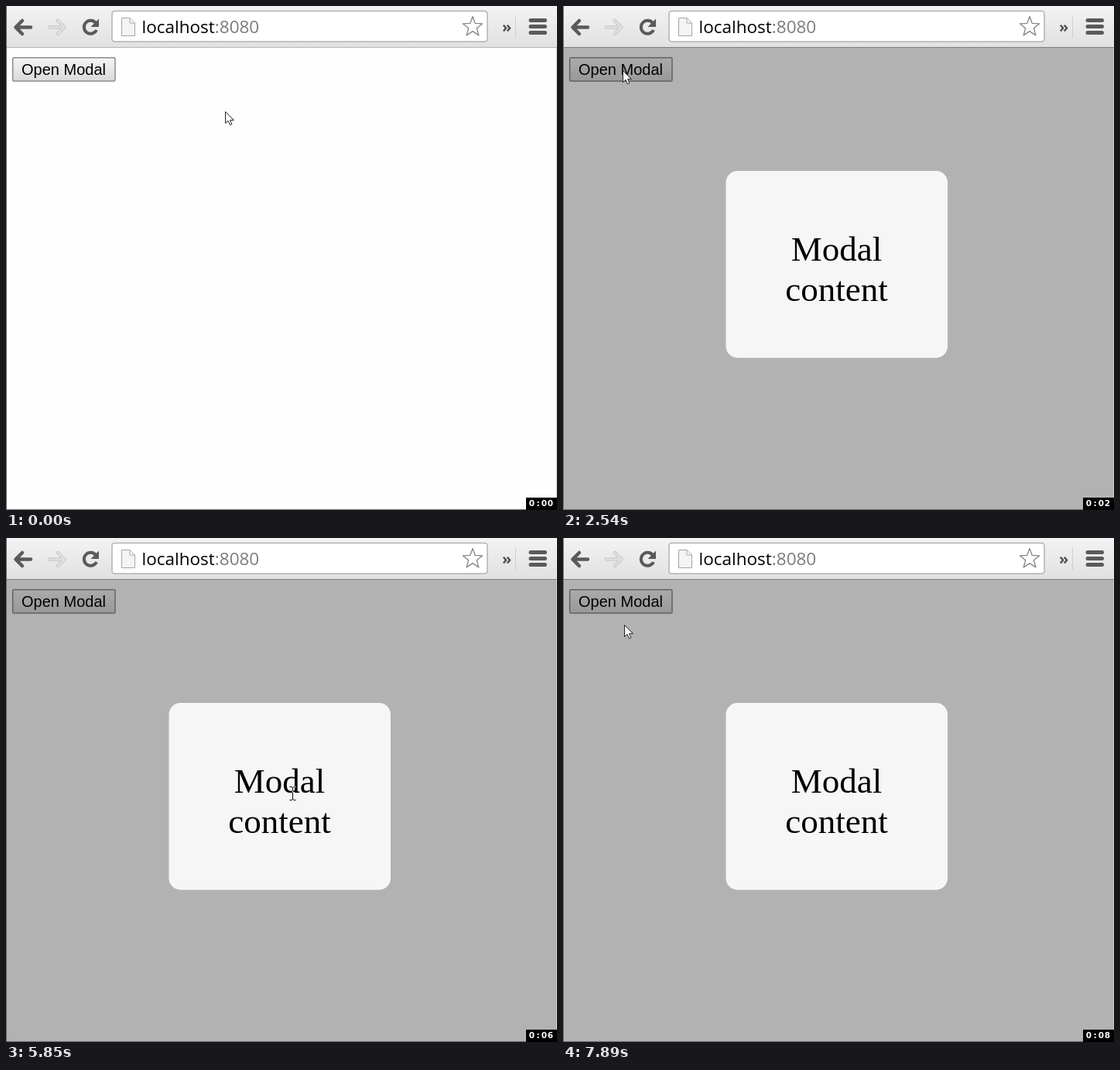
An HTML page for the animation above (7990 ms loop, 712 by 651 pixels).

```html
<!DOCTYPE html>
<html lang="en">
<head>
<meta charset="utf-8">
<title>Modal demo</title>
<style>
  html, body { margin: 0; width: 100%; height: 100%; overflow: hidden; }
  svg { display: block; }
  .url { font: 22.5px "Open Sans", "Noto Sans", sans-serif; }
  .more { font: bold 20px "Open Sans", sans-serif; fill: #505050; }
  .label { font: 20px "Liberation Sans", Arial, sans-serif; }
  .modal { font: 45px "Liberation Serif", "Times New Roman", serif; text-anchor: middle; }
  .clock { font: bold 10.5px "DejaVu Sans", sans-serif; fill: #fff; text-anchor: middle; }
  .icon { fill: none; stroke: #5a5a5a; stroke-width: 4.5; stroke-linejoin: round; stroke-linecap: round; }
  #beam { mix-blend-mode: difference; fill: none; stroke: #fff; }
</style>
</head>
<body>
<svg width="712" height="651" viewBox="0 0 712 651">
  <defs>
    <linearGradient id="bar" x2="0" y2="1"><stop stop-color="#f3f3f3"/><stop offset="1" stop-color="#e1e1e1"/></linearGradient>
    <linearGradient id="idle" x2="0" y2="1"><stop stop-color="#f4f4f4"/><stop offset="1" stop-color="#dadada"/></linearGradient>
    <linearGradient id="hover" x2="0" y2="1"><stop stop-color="#f8f8f8"/><stop offset="1" stop-color="#dedede"/></linearGradient>
    <linearGradient id="down" x2="0" y2="1"><stop stop-color="#d8d8d8"/><stop offset="1" stop-color="#f6f6f6"/></linearGradient>
    <path id="back" d="M32 27.5H13M21 19l-8.5 8.5 8.5 8.5"/>
  </defs>

  <rect width="712" height="651" fill="#fefefe"/>

  <!-- toolbar -->
  <rect width="712" height="53" fill="url(#bar)"/>
  <path d="M0 53.5H712" stroke="#b4b4b4"/>
  <g class="icon">
    <use href="#back"/>
    <g transform="translate(88) scale(-1 1)">
      <use href="#back" stroke="#c6c6c6"/>
      <use href="#back" stroke="#e0e0e0" stroke-width="2.5"/>
    </g>
    <path d="M116 22A8.5 8.5 0 1 0 117 31" stroke-width="4" stroke-linecap="butt"/>
    <path d="M678 18.5h18.5m-18.5 8h18.5m-18.5 8h18.5" stroke-width="5"/>
  </g>
  <path d="M120 16.5V27H109.5Z" fill="#5a5a5a"/>
  <rect x="137" y="6.5" width="485" height="39.5" rx="3.5" fill="#fff" stroke="#b2b2b2" stroke-width="1.5"/>
  <path d="M149.5 15.5H160L166.5 22V38.5H149.5ZM160 15.5V22H166.5" fill="#f4f4f4" stroke="#a6a6a6"/>
  <text class="url" x="175.5" y="34.500">localhost<tspan fill="#7c7c7c">:8080</tspan></text>
  <path id="star" fill="#fff" stroke="#858585" stroke-width="1.3" stroke-linejoin="round"/>
  <text class="more" x="641" y="33.5">»</text>
  <path d="M658.5 12V42" stroke="#cfcfcf"/>

  <!-- page -->
  <rect id="button" x="8.7" y="66.7" width="132.3" height="30.3" rx="1.5" stroke-width="1.5"/>
  <text class="label" x="20" y="89">Open Modal</text>
  <g id="modal">
    <rect x="1" y="53" width="710" height="597" opacity=".3"/>
    <rect x="210.5" y="213" width="286.5" height="241.5" rx="15" fill="#f6f6f6"/>
    <text class="modal" x="353.5" y="329">Modal</text>
    <text class="modal" x="353.5" y="381">content</text>
  </g>
  <path d="M.5 0V651M0 650.5H712" stroke="#686868"/>
  <path d="M711.5 54V651" stroke="#d0d0d0"/>

  <rect x="672" y="635" width="40" height="16"/>
  <text id="clock" class="clock" x="679.5 687.5 695.5 703.5" y="646"></text>

  <!-- pointer -->
  <g id="ring" fill="none">
    <circle r="9" stroke="#fff" stroke-opacity=".45"/>
    <circle r="10" stroke="#222"/>
  </g>
  <path id="arrow" d="M.5.5V15.500L4 12.300 6.500 17.700 8.900 16.700 6.600 11.400H11.300Z" fill="#fff" stroke="#222"/>
  <path id="beam" d="M-3.5-8.5H-1L.5-7.5 2-8.5H4.5M.5-7.5V7.5M-3.5 8.5H-1L.5 7.5 2 8.5H4.5"/>
</svg>
<script>
const LOOP = 7990;
const $ = id => document.getElementById(id);

// Pointer moves: start, end, destination x and y, sideways bend of the path
const origin = [283, 136];
const moves = [
  [120, 450, 115, 217, 0.3],
  [820, 1570, 77, 83, 0.6],
  [2930, 3650, 385, 338, 0.15],
  [3750, 4530, 245, 242, -0.9],
  [4560, 5080, 326, 314, -0.9],
  [5080, 5350, 345, 306, 0],
  [5380, 5850, 370, 330, -1],
  [6000, 6720, 134, 209, -0.1],
  [7080, 7290, 79, 79, 0.1],
  [7740, 7890, 79, 112, 0]
];
const clicks = [[2370, 2510], [6810, 6920], [7530, 7740]];   // press, release

function pointer(t) {
  let [x, y] = origin;
  for (const [start, end, toX, toY, bend] of moves) {
    if (t < start) break;
    const p = Math.min(1, (t - start) / (end - start));
    const u = p * p * (3 - 2 * p), side = 2 * u * (1 - u) * bend;
    const dx = toX - x, dy = toY - y;
    x += dx * u - dy * side;
    y += dy * u + dx * side;
  }
  return [Math.round(x), Math.round(y)];
}

const inside = (x, y, l, t, r, b) => x >= l && x <= r && y >= t && y <= b;
const show = (id, on) => $(id).setAttribute("visibility", on ? "visible" : "hidden");
const place = (id, x, y) => $(id).setAttribute("transform", `translate(${x} ${y})`);

function draw(t) {
  const [x, y] = pointer(t);
  const open = clicks.filter(c => t >= c[1]).length % 2 === 1;
  const press = clicks.find(c => t >= c[0] && t < c[1]);
  const over = !open && inside(x, y, 8, 66, 141, 97);
  const text = open && inside(x, y, 288, 290, 420, 394);

  $("button").setAttribute("fill", `url(#${over ? (press ? "down" : "hover") : "idle"})`);
  $("button").setAttribute("stroke", over && !press ? "#707070" : "#8c8c8c");
  show("modal", open);
  show("ring", press && t < press[0] + 80);
  show("arrow", !text);
  show("beam", text);
  place("arrow", x, y);
  place("beam", x, y);
  place("ring", x + 1.5, y + 1.5);
  $("clock").textContent = "0:0" + Math.floor((t + 162) / 982);
}

const star = Array.from({ length: 10 }, (_, i) => {
  const r = i % 2 ? 5.6 : 13.4, a = (i / 5 - 0.5) * Math.PI;
  return `${603 + r * Math.cos(a)} ${27 + r * Math.sin(a)}`;
});
$("star").setAttribute("d", `M${star.join("L")}Z`);

const begin = performance.now();
function tick() {
  draw((performance.now() - begin) % LOOP);
  requestAnimationFrame(tick);
}
tick();
</script>
</body>
</html>
```
